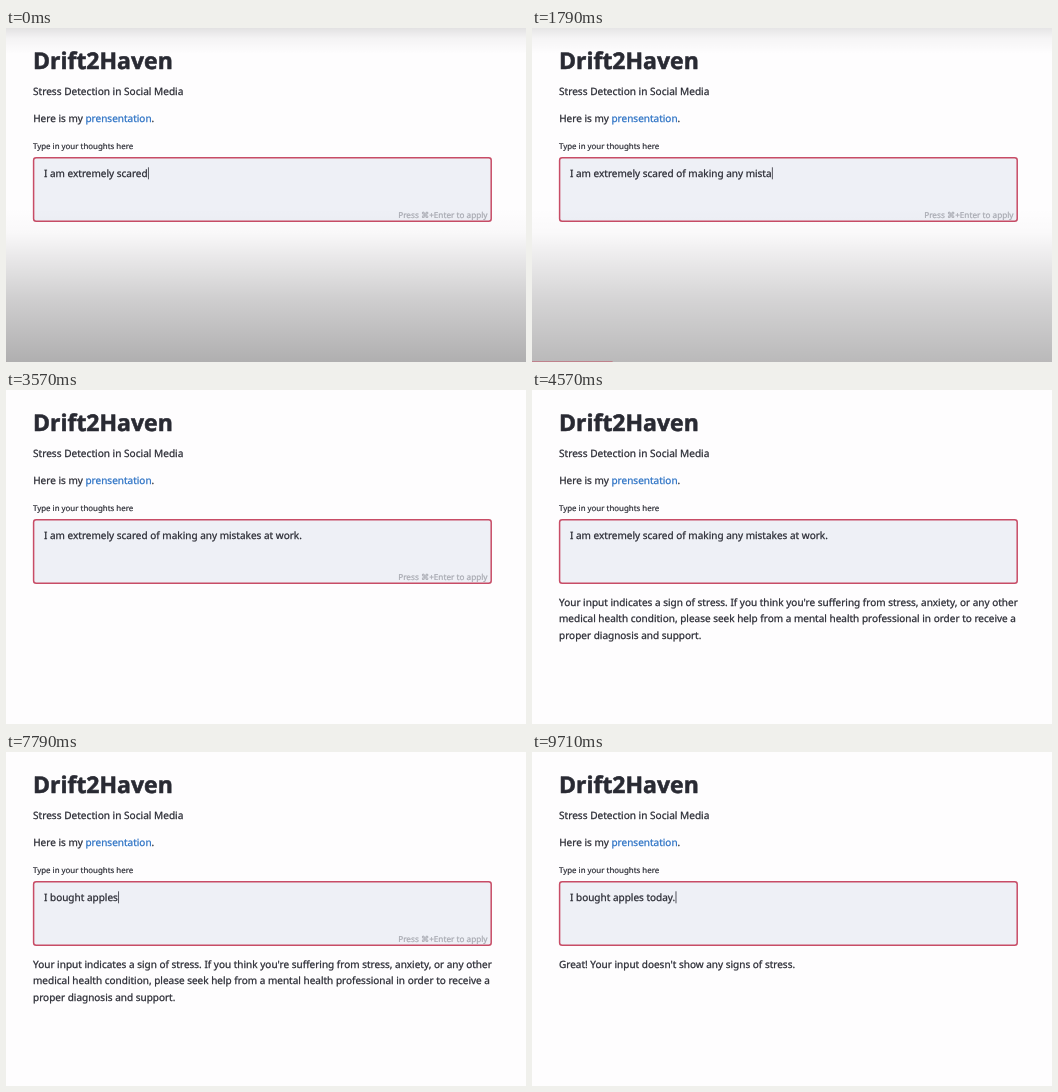
These frames come from a looping animation (520 by 334 pixels, 10 s). An HTML page with a canvas:

```html
<!DOCTYPE html>
<html lang="en">
<head>
<meta charset="utf-8">
<title>Stress check</title>
<style>
html, body { margin: 0; width: 100%; height: 100%; overflow: hidden; background: #fefdfe; }
canvas { display: block; width: 520px; height: 334px; }
</style>
</head>
<body>
<canvas id="stage" width="520" height="334"></canvas>
<script>
const ctx = document.getElementById('stage').getContext('2d');
const W = 520, H = 334, LOOP = 10000;
const FONT = '"Noto Sans", "DejaVu Sans", sans-serif';
const INK = '#292a33';
const TYPE_X = 38;

const FADE_START = 1720, FADE_END = 1860;
const STRESSED = [
  "Your input indicates a sign of stress. If you think you're suffering from stress, anxiety, or any other",
  'medical health condition, please seek help from a mental health professional in order to receive a',
  'proper diagnosis and support.'
];
const RELAXED = ["Great! Your input doesn't show any signs of stress."];

// Each run types its characters evenly from start to end.
const FIRST = [
  [70, 1070, ' of making a'],
  [1140, 1790, 'ny mista'],
  [1860, 2140, 'kes a'],
  [2210, 2710, 't work'],
  [3000, 3000, '.']
];
const SECOND = [
  [6290, 7290, ' bought '],
  [7430, 7790, 'apples'],
  [7860, 8360, ' today'],
  [8570, 8570, '.']
];
const SELECT_AT = 5860, REPLACE_AT = 5930;

function typed(base, runs, t) {
  let s = base;
  for (const [start, end, str] of runs) {
    const step = str.length > 1 ? (end - start) / (str.length - 1) : 0;
    for (let i = 0; i < str.length; i++) {
      if (t >= Math.floor(start + step * i)) s += str[i];
    }
  }
  return s;
}

// A hairline outline gives the letters a slightly heavier weight.
function text(str, x, y, size = 10, color = INK, weight = 400, align = 'left') {
  ctx.font = `${weight} ${size}px ${FONT}`;
  ctx.textAlign = align;
  ctx.fillStyle = ctx.strokeStyle = color;
  ctx.lineWidth = size * 0.025;
  ctx.fillText(str, x, y);
  ctx.strokeText(str, x, y);
  return ctx.measureText(str).width;
}

function drawPage() {
  ctx.fillStyle = '#fefdfe';
  ctx.fillRect(0, 0, W, H);
  text('Drift2Haven', 27, 41.3, 23, INK, 700);
  text('Stress Detection in Social Media', 27, 67.1, 10.1);
  const w = text('Here is my ', 27.2, 94.1);
  const link = text('prensentation', 27.2 + w, 94.1, 10, '#2b71c4');
  text('.', 27.2 + w + link, 94.1);
  text('Type in your thoughts here', 27, 121.1, 7.9);
}

function caretOn(t) {
  if (t >= SELECT_AT && t < REPLACE_AT) return false;
  if (t >= 3570 && t < SELECT_AT) return Math.floor((t - 3570) / 500) % 2 === 1;
  return true;
}

function drawBox(t) {
  ctx.beginPath();
  ctx.roundRect(27.6, 129.8, 457.6, 63.4, 2.5);
  ctx.fillStyle = '#eef0f6';
  ctx.fill();
  ctx.lineWidth = 1.5;
  ctx.strokeStyle = '#c84c66';
  ctx.stroke();

  const line = t < REPLACE_AT ? typed('I am extremely scared', FIRST, t) : typed('I', SECOND, t);
  if (t >= SELECT_AT && t < REPLACE_AT) {
    ctx.font = `400 10px ${FONT}`;
    ctx.fillStyle = '#f7dee6';
    ctx.fillRect(TYPE_X, 139, ctx.measureText(line).width + 0.5, 12.5);
  }
  const w = text(line, TYPE_X, 148.7);
  if (caretOn(t)) {
    ctx.fillStyle = '#44454e';
    ctx.fillRect(TYPE_X + w + 0.3, 139.3, 0.9, 12);
  }
  if (t < 3860 || (t >= REPLACE_AT && t < 9000)) {
    text('Press ⌘+Enter to apply', 481.5, 190.1, 8.2, '#a6a8b0', 400, 'right');
  }
}

function drawResult(t) {
  if (t < 4290) return;
  const lines = t < 9290 ? STRESSED : RELAXED;
  lines.forEach((s, i) => text(s, 27, 215.7 + i * 16.5));
}

function shade(y0, y1, stops) {
  const g = ctx.createLinearGradient(0, y0, 0, y1);
  for (const [p, a] of stops) g.addColorStop(p, `rgba(0,0,0,${a})`);
  ctx.fillStyle = g;
  ctx.fillRect(0, y0, W, y1 - y0);
}

// Player shading and progress line.
function drawOverlay(t) {
  const p = Math.max(0, (t - FADE_START) / (FADE_END - FADE_START));
  ctx.globalAlpha = 1 - p ** 3;
  shade(0, 26, [[0, 0.11], [0.4, 0.04], [1, 0]]);
  shade(180, H, [[0, 0], [0.16, 0.02], [0.34, 0.09], [0.6, 0.19], [1, 0.31]]);
  ctx.fillStyle = '#c07a86';
  ctx.fillRect(0, 333, t * 0.045, 1);
  ctx.globalAlpha = 1;
}

function draw(t) {
  ctx.textRendering = 'geometricPrecision';
  ctx.textBaseline = 'alphabetic';
  ctx.lineJoin = 'round';
  drawPage();
  drawBox(t);
  drawResult(t);
  if (t < FADE_END) drawOverlay(t);
}

const begin = performance.now();
function frame() {
  draw((performance.now() - begin) % LOOP);
  requestAnimationFrame(frame);
}
frame();
</script>
</body>
</html>
```
